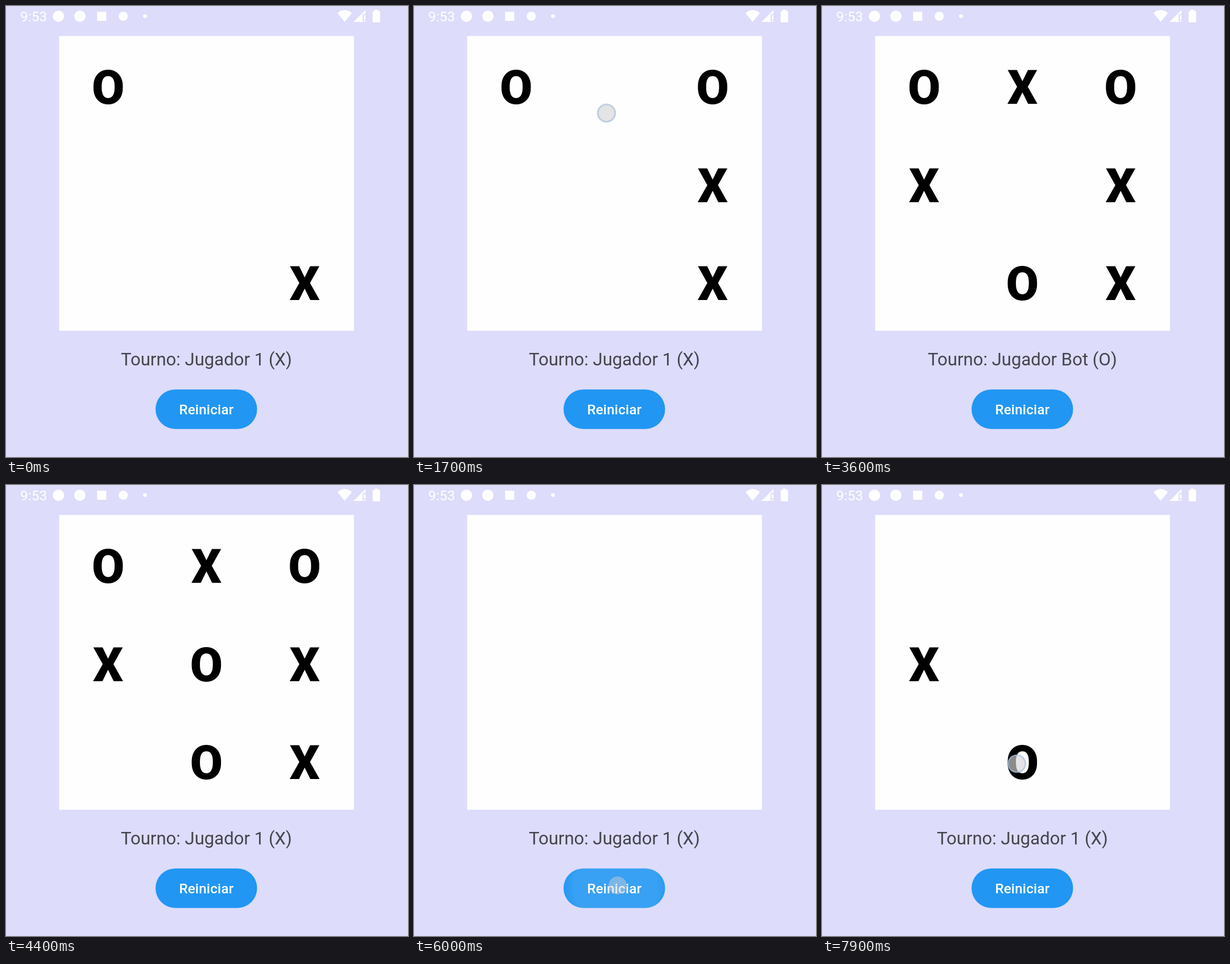
Animation of 707x793 px, one loop 8 s. Source, as an HTML page:

```html
<!DOCTYPE html>
<html lang="es">
<head>
<meta charset="utf-8">
<title>Tres en raya</title>
<style>
  html, body { margin: 0; width: 100%; height: 100%; overflow: hidden; background: #dddcfb; }
  svg { display: block; width: 707px; height: 793px; font-family: Roboto, "Liberation Sans", sans-serif; }
  .marks text { font-size: 83px; font-weight: 900; text-anchor: middle; }
  .turn text { font-size: 31.1px; text-anchor: middle; fill: #46454e; }
  .label { font-size: 24.2px; font-weight: 500; letter-spacing: .17px; text-anchor: middle; fill: #fff; }
  .clock { font-size: 24.5px; }

  /* 1% of the loop is 80 ms */
  .marks text, .turn text, .tap, .ripple { animation: 8s step-end infinite; }
  .marks .start { animation-name: start; }
  .marks .right { animation-name: right; }
  .marks .top-right { animation-name: top-right; }
  .marks .top { animation-name: top; }
  .marks .bottom { animation-name: bottom; }
  .marks .left { animation-name: left; }
  .marks .center { animation-name: center; }
  .marks .bottom-left { animation-name: bottom-left; }
  .turn .player { animation-name: player; }
  .turn .bot { animation-name: bot; }
  .turn .draw { animation-name: draw; }
  .tap { animation-name: tap; }
  .ripple { animation-name: ripple; transform-origin: 355px 707px; }

  @keyframes start { 0% { opacity: 1 } 73.75%, 100% { opacity: 0 } }
  @keyframes right { 0%, 73.75%, 100% { opacity: 0 } 6.25% { opacity: 1 } }
  @keyframes top-right { 0%, 73.75%, 100% { opacity: 0 } 15% { opacity: 1 } }
  @keyframes top { 0%, 73.75%, 100% { opacity: 0 } 22.5% { opacity: 1 } }
  @keyframes bottom { 0%, 73.75% { opacity: 0 } 31.25%, 93.75%, 100% { opacity: 1 } }
  @keyframes left { 0%, 73.75% { opacity: 0 } 40%, 85%, 100% { opacity: 1 } }
  @keyframes center { 0%, 73.75%, 100% { opacity: 0 } 48.75% { opacity: 1 } }
  @keyframes bottom-left { 0%, 73.75%, 100% { opacity: 0 } 61.25% { opacity: 1 } }

  @keyframes player {
    0%, 15%, 31.25%, 48.75%, 73.75%, 93.75%, 100% { opacity: 1 }
    6.25%, 22.5%, 40%, 61.25%, 85% { opacity: 0 }
  }
  @keyframes bot {
    0%, 15%, 31.25%, 48.75%, 93.75%, 100% { opacity: 0 }
    6.25%, 22.5%, 40%, 85% { opacity: 1 }
  }
  @keyframes draw { 0%, 73.75%, 100% { opacity: 0 } 61.25% { opacity: 1 } }

  @keyframes tap {
    0%, 7.5%, 23.75%, 41.25%, 62.5%, 76.25%, 86.25% { opacity: 0; transform: none }
    5% { opacity: 1; transform: translate(545px, 322px) }
    21.25% { opacity: 1; transform: translate(338.5px, 188.3px) }
    38.75% { opacity: 1; transform: translate(185px, 322px) }
    60% { opacity: 1; transform: translate(185px, 461.5px) }
    72.5% { opacity: 1; transform: translate(358px, 704px) }
    75% { opacity: .65; transform: translate(358px, 704px) }
    83.75% { opacity: 1; transform: translate(185px, 322px) }
    98.75%, 100% { opacity: 1; transform: translate(342.5px, 490px) }
  }
  @keyframes ripple {
    0%, 77.5%, 100% { opacity: 0; transform: scale(.3) }
    72.5% { opacity: 1; transform: scale(.4) }
    73.75% { opacity: 1; transform: scale(.75) }
    75% { opacity: 1; transform: scale(1) }
    76.25% { opacity: .5; transform: scale(1.15) }
  }
</style>
</head>
<body>
<svg viewBox="0 0 707 793">
  <defs>
    <clipPath id="pill"><rect x="263" y="674.2" width="178.6" height="69.5" rx="34.7"/></clipPath>
    <radialGradient id="glow">
      <stop offset=".75" stop-color="#fff" stop-opacity=".11"/>
      <stop offset="1" stop-color="#fff" stop-opacity="0"/>
    </radialGradient>
  </defs>
  <rect width="707" height="793" fill="#dddcfb"/>

  <g fill="#fff">
    <text class="clock" x="25" y="26.7">9:53</text>
    <circle cx="92.3" cy="18" r="10"/>
    <circle cx="130" cy="18" r="10"/>
    <rect x="160.3" y="10" width="16" height="16"/>
    <circle cx="206.3" cy="18" r="8"/>
    <circle cx="244.3" cy="17.8" r="3.3"/>
    <path d="M595.6 28 583 12.5Q595.6 1.5 608.2 12.5Z"/>
    <path d="M611 28 632.3 7V14H627.3V28Z"/>
    <path d="M629.3 16h3v7.5h-3zM629.3 25.3h3v2.7h-3z"/>
    <rect x="644.7" y="8.7" width="13.3" height="20" rx="1.6"/>
    <rect x="648" y="6.5" width="6.7" height="4"/>
  </g>

  <rect x="93.4" y="52.6" width="518.4" height="518.4" fill="#fefefe"/>
  <g class="marks">
    <text class="start" x="179.6" y="171.7">O</text>
    <text class="top" x="352.4" y="171.7">X</text>
    <text class="top-right" x="525.2" y="171.7">O</text>
    <text class="left" x="179.6" y="344.5">X</text>
    <text class="center" x="352.4" y="344.5">O</text>
    <text class="right" x="525.2" y="344.5">X</text>
    <text class="bottom-left" x="179.6" y="517.3">X</text>
    <text class="bottom" x="352.4" y="517.3">O</text>
    <text class="start" x="525.2" y="517.3">X</text>
  </g>

  <g class="turn">
    <text class="player" x="352.4" y="632">Tourno: Jugador 1 (X)</text>
    <text class="bot" x="352.4" y="632">Tourno: Jugador Bot (O)</text>
    <text class="draw" x="352.4" y="632">¡Empate!</text>
  </g>

  <g clip-path="url(#pill)">
    <rect x="263" y="674" width="179" height="70" fill="#2196f3"/>
    <circle class="ripple" cx="355" cy="707" r="96" fill="url(#glow)"/>
  </g>
  <text class="label" x="352.4" y="718.3">Reiniciar</text>

  <g class="tap">
    <circle r="16" fill="none" stroke="#5a6fa0" stroke-opacity=".18" stroke-width="2"/>
    <circle r="15" fill="#d6d6d6" fill-opacity=".65" stroke="#a9c0e0" stroke-width="1.6"/>
  </g>
</svg>
</body>
</html>
```
